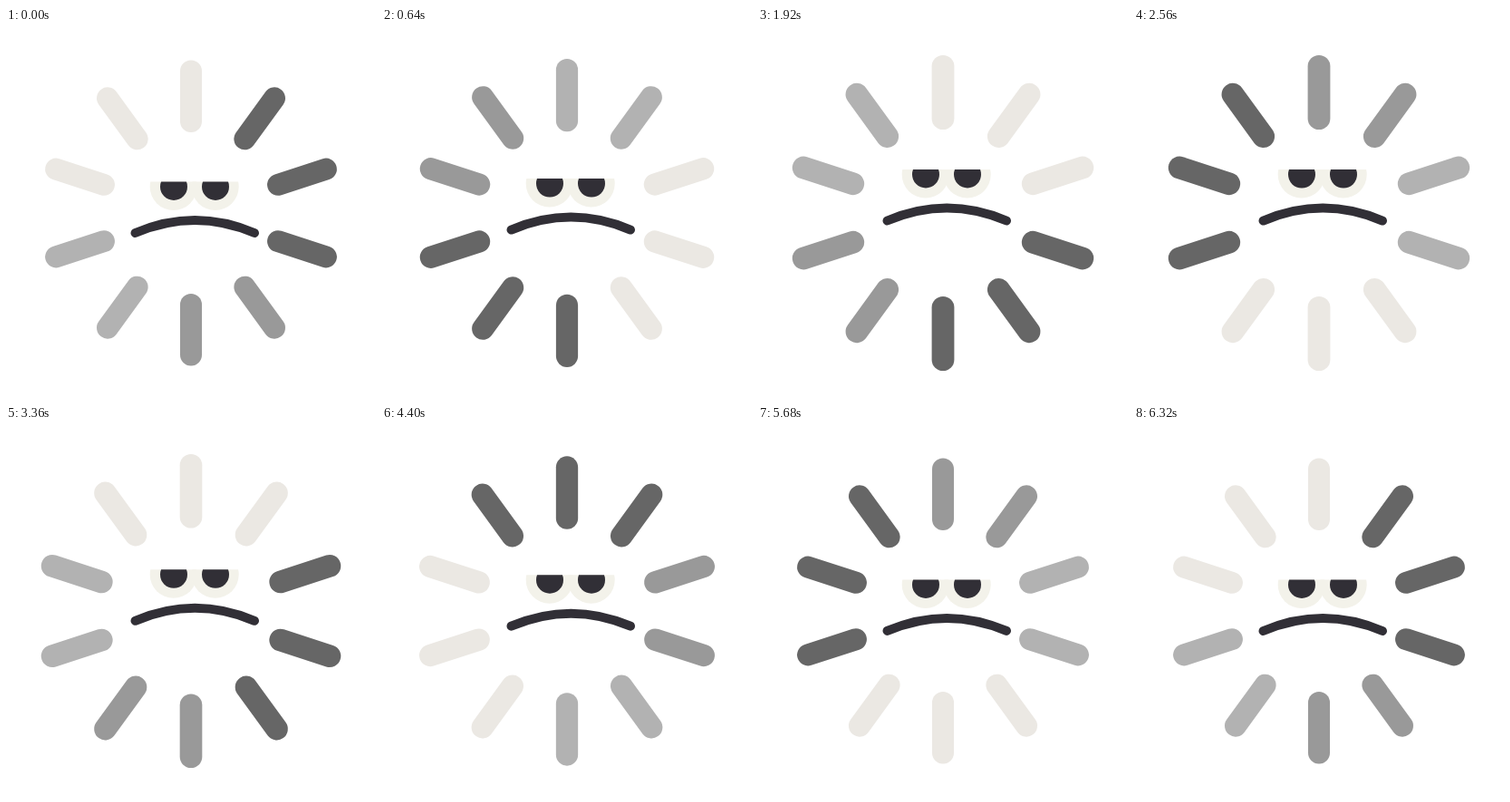
Recreate the animation shown at these times as an HTML page. Size 408 by 408 pixels, loop 6.4 s.

```html
<!DOCTYPE html>
<html lang="en">
<head>
<meta charset="utf-8">
<title>Grumpy loader</title>
<style>
  html, body { margin: 0; width: 100%; height: 100%; overflow: hidden; background: #fff; }
  svg { display: block; width: 100vw; height: 100vh; }
  #bars line { stroke-width: 24; stroke-linecap: round; }
</style>
</head>
<body>
<svg viewBox="0 0 408 408">
  <defs>
    <clipPath id="lid"><rect x="150" y="169.5" width="116" height="40"/></clipPath>
  </defs>
  <g id="bars"></g>
  <g id="face">
    <g clip-path="url(#lid)">
      <g fill="#f3f2ea">
        <circle cx="184.7" cy="175" r="26"/>
        <circle cx="230.7" cy="175" r="26"/>
      </g>
      <g fill="#312f36">
        <circle cx="185" cy="175" r="15"/>
        <circle cx="231" cy="175" r="15"/>
      </g>
    </g>
    <path d="M142.5 226Q208.3 198 274 226" fill="none" stroke="#312f36" stroke-width="10" stroke-linecap="round"/>
  </g>
</svg>
<script>
  const LOOP = 6400, TICK = 80, STEP = 158, LEAD = 35;
  const GROW = 0.033, LIFT = 13.5;
  const DARK = '#666666', MID = '#999999', SOFT = '#b2b2b2', PALE = '#ebe8e3';
  const SHADES = [DARK, DARK, DARK, MID, MID, SOFT, SOFT, PALE, PALE, PALE];
  const COUNT = SHADES.length;

  const barGroup = document.getElementById('bars');
  const face = document.getElementById('face');

  const bars = SHADES.map((_, i) => {
    const bar = document.createElementNS('http://www.w3.org/2000/svg', 'line');
    const attrs = { x1: 0, x2: 0, y1: -101, y2: -156.5, transform: `rotate(${i * 360 / COUNT})` };
    for (const name in attrs) bar.setAttribute(name, attrs[name]);
    return barGroup.appendChild(bar);
  });

  function ease(t, from, to) {
    const x = Math.min(1, Math.max(0, (t - from) / (to - from)));
    return x * x * (3 - 2 * x);
  }

  function draw(now) {
    const t = Math.floor((now % LOOP) / TICK) * TICK;
    const rise = ease(t, 0, 1930) - ease(t, 2470, 5840);
    const head = 1 + Math.floor((t + LEAD) / STEP);

    barGroup.setAttribute('transform', `translate(204 204) scale(${1 + GROW * rise})`);
    face.setAttribute('transform', `translate(0 ${-LIFT * rise})`);
    bars.forEach((bar, i) => {
      bar.setAttribute('stroke', SHADES[(i - head % COUNT + COUNT) % COUNT]);
    });
  }

  const start = performance.now();
  function frame() {
    draw(performance.now() - start);
    requestAnimationFrame(frame);
  }
  frame();
</script>
</body>
</html>
```
